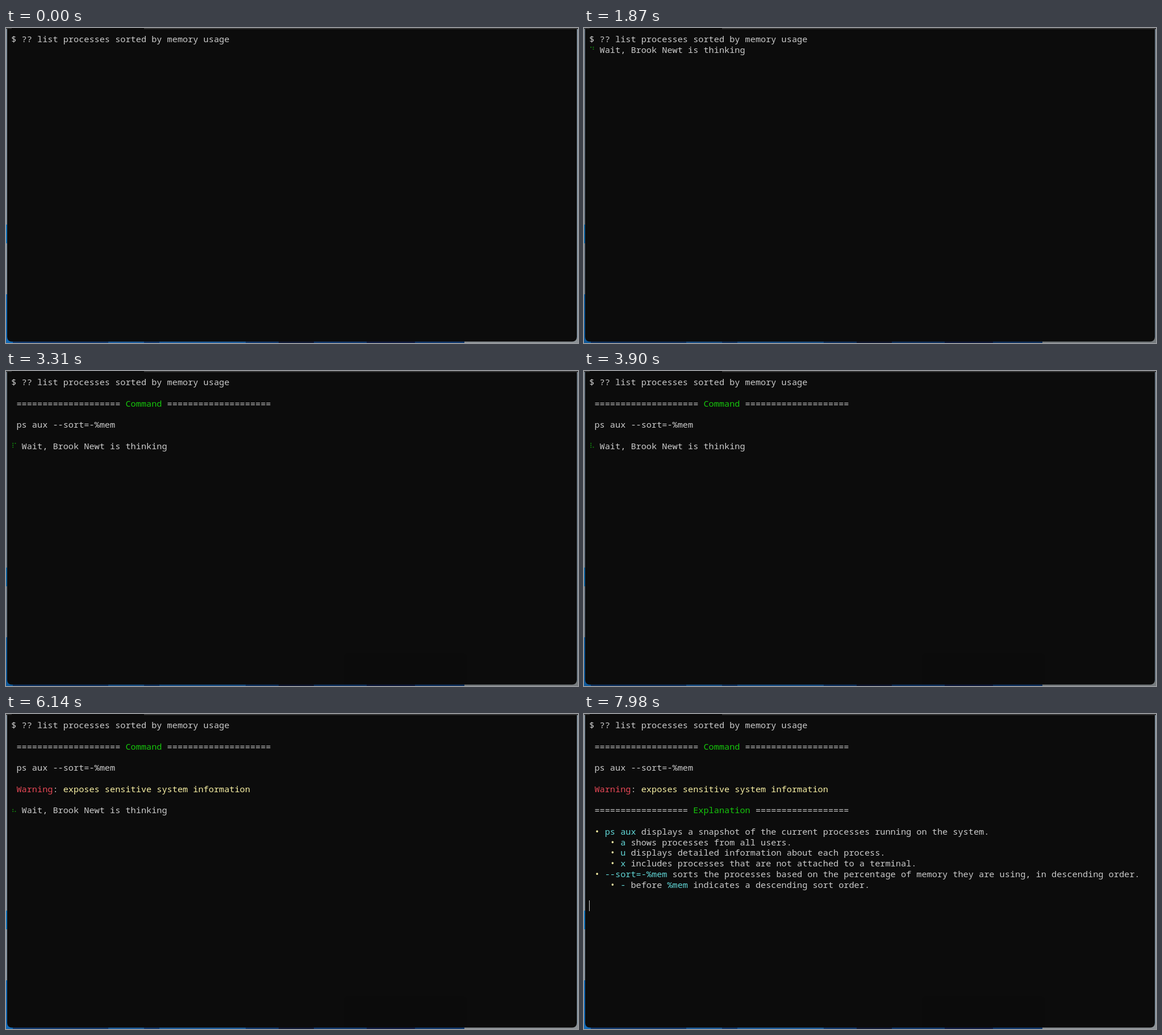
An HTML page with a canvas for the animation above (8 s loop, 1007x556 px).

```html
<!DOCTYPE html>
<html lang="en">
<head>
<meta charset="utf-8">
<title>Terminal session</title>
<style>
  html, body { margin: 0; width: 100%; height: 100%; overflow: hidden; background: #0c0c0c; }
  canvas { display: block; }
</style>
</head>
<body>
<canvas id="stage" width="1007" height="556"></canvas>
<script>
const W = 1007, H = 556, LOOP = 8000;
const CELL = 9.143, ROW = 18.75, LEFT = 9.3, TOP = 10.4;
const COLORS = { w: '#cccccc', g: '#16c60c', r: '#e74856', y: '#f9f1a5', c: '#61d6d6' };
const SPINNER = '⠋⠙⠹⠸⠼⠴⠦⠧⠇⠏';

// Moments of the session, in ms
const THINK_1 = 950, COMMAND = 2420, THINK_2 = 2540, CARD_END = 2830,
      WARNING = 3995, EXPLAIN = 7890, CURSOR = 7980;

const ctx = document.getElementById('stage').getContext('2d');

function rect(color, x, y, w, h) {
  ctx.fillStyle = color;
  ctx.fillRect(x, y, w, h);
}

function panel(fill, x, y, w, h, radius) {
  ctx.fillStyle = fill;
  ctx.beginPath();
  ctx.roundRect(x, y, w, h, radius);
  ctx.fill();
}

// Prints on the character grid; "~k" switches to colour k
function print(row, markup) {
  let col = 0;
  ('w' + markup).split('~').forEach(part => {
    ctx.fillStyle = COLORS[part[0]];
    for (const ch of part.slice(1)) {
      ctx.fillText(ch, LEFT + col++ * CELL, TOP + row * ROW + 15);
    }
  });
}

function heading(row, title, bars) {
  const line = '='.repeat(bars);
  print(row, ` ${line} ~g${title}~w ${line}`);
}

function thinking(row, elapsed) {
  const dots = SPINNER.charCodeAt(Math.floor(elapsed / 80) % 10);
  for (let i = 0; i < 6; i++) {
    if (dots >> i & 1) {
      rect('#13a10e', i < 3 ? 11.4 : 15.6, TOP + row * ROW + 4 + i % 3 * 3.4, 1.7, 1.6);
    }
  }
  print(row, '  Wait, Brook Newt is thinking');
}

function desktop(dim) {
  rect('#82919e', 0, 0, W, H);
  rect('#1677bd', 0, 347, 3, 33);
  rect('#1269b5', 0, 470, 12, 86);
  rect('#123a70', 12, 548, 795, 8);
  rect('#1d5c9c', 180, 553, 63, 3);
  rect('#1d5c9c', 270, 553, 152, 3);
  rect('#111b38', 480, 553, 62, 3);
  rect('#101d45', 635, 553, 85, 3);
  rect('#8b9195', 807, 548, 200, 8);
  if (dim) rect(`rgba(0,0,0,${dim})`, 0, 0, W, H);
  panel('#0c0c0c', 2, 0, 1003, 553.5, [0, 0, 8, 8]);
  rect('#333333', 0, 0, 10, 1.5);
  rect('#333333', 243, 0, 764, 2);
}

function card() {
  const fill = ctx.createRadialGradient(690, 575, 5, 690, 575, 90);
  fill.addColorStop(0, '#dcdce8');
  fill.addColorStop(1, '#d5d5d5');
  ctx.save();
  ctx.shadowColor = '#000';
  ctx.shadowBlur = 8;
  panel(fill, 599, 503, 207.5, 70, 8);
  ctx.restore();
}

function draw(t) {
  desktop(t < 190 || t >= WARNING ? 0 : t < 290 ? 0.08 : 0.16);
  ctx.font = '15.24px "Noto Sans Mono", "DejaVu Sans Mono", monospace';
  print(0, '$ ?? list processes sorted by memory usage');

  if (t >= THINK_1 && t < COMMAND) thinking(1, t - THINK_1);
  if (t >= COMMAND) {
    heading(2, 'Command', 20);
    print(4, ' ps aux --sort=-%mem');
    if (t < CARD_END) card();
    else panel('#0b0b0b', 595, 498, 216, 55, [8, 8, 0, 0]);
  }
  if (t >= THINK_2 && t < WARNING) thinking(6, t - THINK_2);
  if (t >= WARNING) {
    print(6, ' ~rWarning~w: ~yexposes sensitive system information');
    if (t < EXPLAIN) thinking(8, t - WARNING);
  }
  if (t >= EXPLAIN) {
    heading(8, 'Explanation', 18);
    [
      ' ~y• ~cps aux~w displays a snapshot of the current processes running on the system.',
      '    ~y• ~ca~w shows processes from all users.',
      '    ~y• ~cu~w displays detailed information about each process.',
      '    ~y• ~cx~w includes processes that are not attached to a terminal.',
      ' ~y• ~c--sort=-%mem~w sorts the processes based on the percentage of memory they are using, in descending order.',
      '    ~y• ~c-~w before ~c%mem~w indicates a descending sort order.'
    ].forEach((line, i) => print(10 + i, line));
  }
  if (t >= CURSOR) rect('#cccccc', 9, 329, 1, 19);
}

function tick() {
  draw(performance.now() % LOOP);
  requestAnimationFrame(tick);
}
tick();
</script>
</body>
</html>
```
